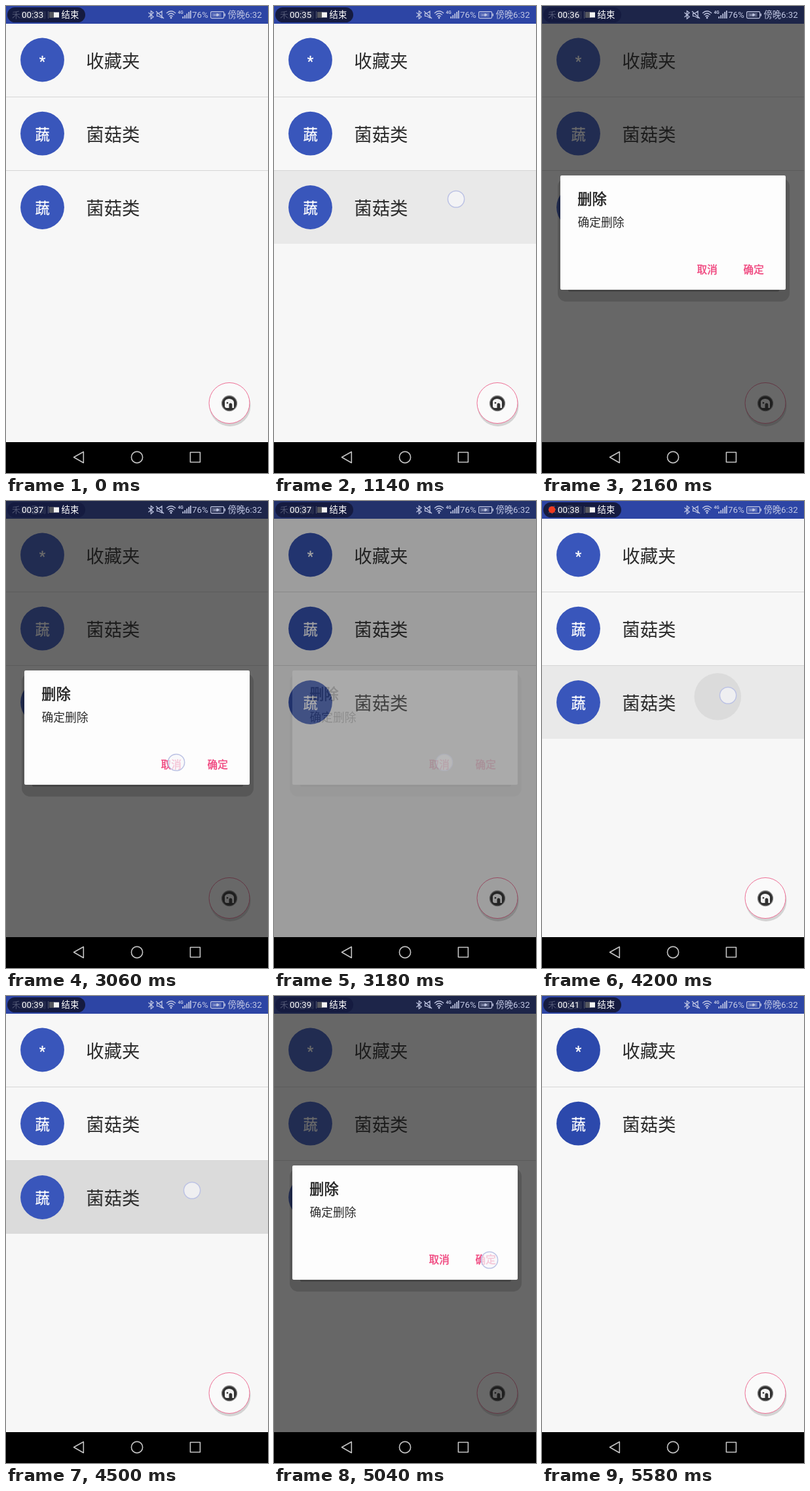
Write an HTML page that moves like this. It is 400x711 px and loops after 5640 ms.

```html
<!DOCTYPE html>
<html lang="zh-CN">
<head>
<meta charset="utf-8">
<title>删除列表项</title>
<style>
html, body { margin: 0; width: 100%; height: 100%; overflow: hidden; background: #f7f7f7; }
svg { display: block; width: 400px; height: 711px; font-family: "Noto Sans CJK SC", "Noto Sans CJK", sans-serif; }
.latin { font-family: Roboto, "Noto Sans CJK SC", sans-serif; }
.name { font-size: 27.4px; fill: #2b2b2b; }
.avatar circle { fill: var(--blue); }
.avatar text { font-size: 22.2px; fill: #fff; stroke: #fff; stroke-width: .3; text-anchor: middle; }
.rule { fill: #d6d6d6; }
.title { font-size: 22.2px; fill: #222; stroke: #222; stroke-width: .6; }
.button { font-size: 15.55px; fill: #f0477f; stroke: #f0477f; stroke-width: .45; }
.line { fill: none; stroke: #c2c8e4; stroke-width: 1.2; }
.nav { fill: none; stroke: #c4c4c4; stroke-width: 1.6; stroke-linejoin: round; }
</style>
</head>
<body>
<svg viewBox="0 0 400 711">
  <defs><clipPath id="rowClip"><rect y="251" width="400" height="111"/></clipPath></defs>

  <rect width="400" height="711" fill="#f7f7f7"/>
  <rect width="400" height="27" fill="#2d45a5"/>

  <g id="list">
    <g>
      <g class="avatar"><circle cx="55.5" cy="82" r="33.4"/><text class="latin" x="55.5" y="92">*</text></g>
      <text class="name" x="122.3" y="94">收藏夹</text>
    </g>
    <rect class="rule" y="138" width="400" height="1"/>
    <g>
      <g class="avatar"><circle cx="55.5" cy="194.2" r="33.4"/><text x="55.5" y="203.5">蔬</text></g>
      <text class="name" x="122.3" y="206">菌菇类</text>
    </g>
    <g id="lastRow">
      <rect class="rule" y="250" width="400" height="1"/>
      <g clip-path="url(#rowClip)">
        <rect id="press" y="251" width="400" height="111" fill-opacity=".06"/>
        <circle id="ripple" fill-opacity=".06"/>
      </g>
      <g class="avatar"><circle cx="55.5" cy="306.5" r="33.4"/><text x="55.5" y="315.5">蔬</text></g>
      <text class="name" x="122.3" y="318">菌菇类</text>
    </g>
  </g>

  <g id="fab">
    <circle cx="342" cy="608.5" r="31.5" fill="#d3d3d3"/>
    <circle cx="341" cy="604.5" r="31" fill="#fafafa" stroke="#ee6f95"/>
    <circle cx="341" cy="605" r="11.5" fill="#303030" stroke="#858585" stroke-width="1.3"/>
    <path d="M334 602Q335 598.5 340.5 598Q347 598.5 348 603V612H337Q334 612 334 609Z" fill="#f2f2f2"/>
    <path d="M340.5 612V607Q340.5 604.5 343 604.5Q345.3 604.5 345.3 607V612Z" fill="#303030"/>
    <circle cx="338" cy="604.3" r="1.3" fill="#303030"/>
  </g>

  <rect id="scrim" width="400" height="664" fill="#141414"/>

  <g id="dialog">
    <rect x="24" y="262" width="354" height="188" rx="13" fill-opacity=".16"/>
    <rect x="40" y="430" width="322" height="5" rx="2" fill-opacity=".2"/>
    <rect x="28" y="258" width="344" height="174" rx="2" fill="#fdfdfd"/>
    <text class="title" x="54.3" y="301.5">删除</text>
    <text x="54.5" y="336" font-size="17.8" fill="#2b2b2b">确定删除</text>
    <text class="button" x="236.6" y="407.3">取消</text>
    <text class="button" x="307.6" y="407.3">确定</text>
  </g>

  <g id="status">
    <path class="line" d="M217.5 10L225 16.5L221.3 19.5V7.5L225 10.3L217.5 17"/>
    <path class="line" d="M229 8L241 19M230.5 11.5H233L238 8V18L233 15.5H230.5Z"/>
    <path class="line" d="M245 11Q252 4.5 259 11M247.2 13.5Q252 9 256.8 13.5M249.3 16Q252 13.5 254.7 16"/>
    <circle cx="252" cy="18" r="1.4" fill="#c2c8e4"/>
    <text class="latin" x="262.5" y="12" font-size="6.5" font-weight="700" fill="#c2c8e4">4G</text>
    <path d="M270.2 19V16M273.2 19V14M276.2 19V11.5M279.2 19V9M281.8 19V7" stroke="#c2c8e4" stroke-width="1.7"/>
    <rect class="line" x="312.6" y="8.6" width="20" height="10" rx="1.5"/>
    <rect x="314.5" y="10.5" width="14" height="6" fill="#c2c8e4" fill-opacity=".35"/>
    <path d="M333.5 11.5H335V15.5H333.5M317 13.5H321L322 11L326 13.5L322 16L321 14.2H317Z" fill="#c2c8e4"/>
    <text class="latin" x="284" y="18.3" font-size="13.3" fill="#c2c8e4">76%</text>
    <text class="latin" x="338.5" y="18.3" font-size="13.3" fill="#c2c8e4">傍晚6:32</text>
  </g>

  <g id="recorder">
    <rect x="2" y="2" width="119" height="23" rx="11.5" fill="#151b40"/>
    <text x="9" y="18.3" font-size="13" fill="#4d5371">禾川通信</text>
    <rect x="23" y="8" width="38" height="11" fill="#252b4c"/>
    <circle id="dot" cx="15.2" cy="13.3" r="5.2" fill="#ee3b20"/>
    <text id="clock" class="latin" x="24" y="18.2" font-size="13.3" fill="#fff"></text>
    <rect x="64" y="8" width="1" height="11" fill="#555a72"/>
    <rect x="66" y="9" width="8" height="9" fill="#55575f"/>
    <rect x="73" y="9.5" width="8" height="8" fill="#f2f2f2"/>
    <text x="84.5" y="18.3" font-size="13.4" fill="#fff">结束</text>
  </g>

  <rect y="664" width="400" height="47"/>
  <path class="nav" d="M103.5 687L118.3 678.8V695.5Z"/>
  <circle class="nav" cx="200" cy="687" r="8.6"/>
  <rect class="nav" x="281.4" y="679.5" width="15" height="15"/>

  <circle id="touch" r="12.6" fill="#f6f6f9" fill-opacity=".72" stroke="#bcc2e4" stroke-width="1.5"/>
</svg>

<script>
const LOOP = 5640, STEP = 60;
const [press, ripple, lastRow, scrim, dialog, dot, clock, touch, list] =
  ["press", "ripple", "lastRow", "scrim", "dialog", "dot", "clock", "touch", "list"]
    .map(id => document.getElementById(id));

const ticks = [540, 1020, 1860, 2760, 3600, 4500, 5100, 5460];
const blinks = [[300, 540], [900, 1020], [1320, 1860], [2580, 2760],
                [3360, 3600], [4200, 4500], [5100, 5160], [5400, 5460]];
const touches = [
  { x: 278, y: 294, from: 1080, to: 1500 },
  { x: 260, y: 398, from: 2880, to: 3240 },
  { x: 284, y: 296, from: 4200, to: 4740 },
  { x: 329, y: 402, from: 4980, to: 5220 }
];
const presses = [
  { x: 278, y: 294, from: 1080, spread: 1320, open: 1800, close: 3070 },
  { x: 284, y: 296, from: 4200, spread: 4140, open: 4740, close: 5090 }
];

const ramp = (t, start, length) => Math.min(1, Math.max(0, (t - start) / length));
const within = (t, from, to) => t >= from && t < to;
const set = (el, attrs) => { for (const k in attrs) el.setAttribute(k, attrs[k]); };

function drawPress(t) {
  const p = presses[t < 4000 ? 0 : 1];
  const opened = ramp(t, p.open, 240);
  const held = t >= p.from ? 1 - opened : 0;
  const grow = ramp(t, p.spread, 320);
  set(press, { opacity: held });
  set(ripple, {
    cx: p.x + (200 - p.x) * grow,
    cy: p.y + (306 - p.y) * grow,
    r: 290 * grow * (0.58 + 0.42 * grow),
    opacity: held
  });
  set(scrim, { opacity: 0.63 * opened * (1 - ramp(t, p.close, 300)) });
  set(dialog, { opacity: opened * (1 - ramp(t, p.close, 128)) });
  // Avatars are a deeper blue for a moment after the dialog closes.
  list.style.setProperty("--blue", within(t, p.close, p.close + 600) ? "#2c49ac" : "#3956bb");
}

function drawTouch(t) {
  const p = touches.find(p => within(t, p.from, p.to));
  set(touch, p ? { cx: p.x, cy: p.y, opacity: ramp(p.to - t, 0, 120) ** 2 } : { opacity: 0 });
}

function draw(now) {
  const t = Math.floor((now % LOOP) / STEP) * STEP;
  drawPress(t);
  drawTouch(t);
  set(lastRow, { opacity: t < 5280 ? 1 : 0 });
  set(dot, { opacity: blinks.some(([a, b]) => within(t, a, b)) ? 1 : 0 });
  clock.textContent = "00:" + (33 + ticks.filter(s => t >= s).length);
}

const start = performance.now();
function frame() {
  draw(performance.now() - start);
  requestAnimationFrame(frame);
}
frame();
</script>
</body>
</html>
```
